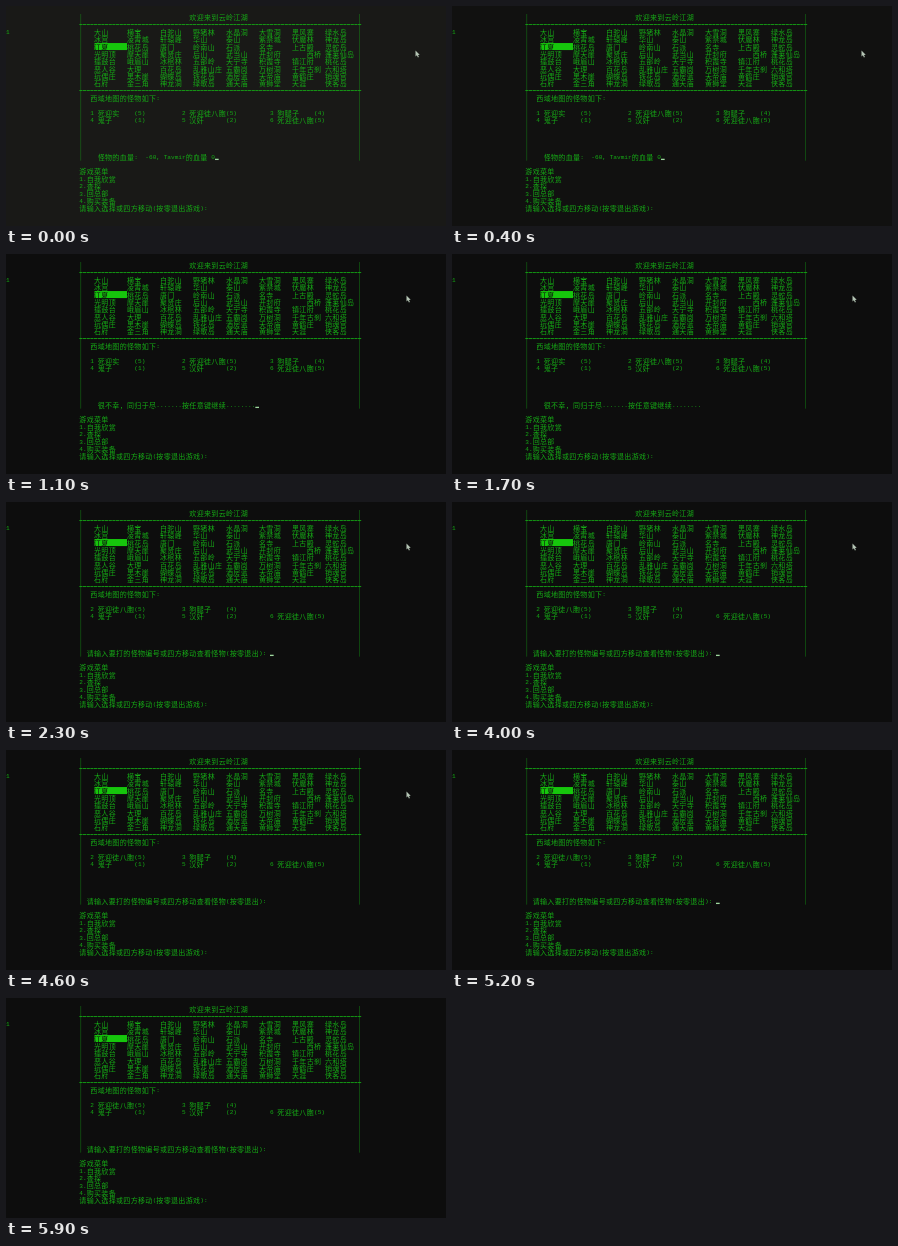
An HTML page with a canvas for the animation above (6000 ms loop, 440 by 220 pixels).

```html
<!DOCTYPE html>
<html lang="zh-CN">
<head>
<meta charset="utf-8">
<title>文字江湖</title>
<style>
  html, body { margin: 0; width: 100%; height: 100%; overflow: hidden; background: #0d0d0d; }
  canvas { display: block; width: 440px; height: 220px; }
</style>
</head>
<body>
<canvas id="stage" width="440" height="220"></canvas>
<script>
const ctx = document.getElementById('stage').getContext('2d');
const LOOP = 6000, CELL = 11 / 3, LINE = 22 / 3, TOP = 11.7;
const GREEN = '#16ac16', BRIGHT = '#16c60c', DARK = '#0d0d0d';
const HERO = 'Tavmir';

const places = [
  '大山 横宝 白驼山 野猪林 水晶洞 大雪洞 黑风寨 绿水岛',
  '冰宫 凌霄城 轩辕峰 华山 泰山 紫禁城 伏魔林 神龙岛',
  '江夏 桃花岛 唐门 岭南山 石派 名寺 上古殿 灵蛇岛',
  '光明顶 摩天崖 聚贤庄 后山 武当山 开封府 _ 蓬莱仙岛',
  '擂鼓台 峨眉山 冰棺林 五部岭 天宁寺 积霞寺 镇江府 桃花岛',
  '恶人谷 大理 百花岛 乱雅山庄 五霸岗 万树洞 千年古刹 六和塔',
  '玩偶庄 黑木崖 蝴蝶岛 铁花岛 酒房蓝 天帝庙 黄鹤庄 销魂宫',
  '石府 金三角 神龙洞 绿歌岛 通天庙 黄狮堂 天涯 侠客岛'
];
const menu = ['游戏菜单', '1.自我欣赏', '2.查探', '3.回总部', '4.购买装备',
  '请输入选择或四方移动(按零退出游戏):'];
const foes = [
  ['死迎实', 5], ['死迎徒八胞', 5], ['狗腿子', 4],
  ['鬼子', 1], ['汉奸', 2], ['死迎徒八胞', 5]
];
const ask = { col: 22, text: '请输入要打的怪物编号或四方移动查看怪物(按零退出): ' };
const scenes = [
  { at: 0, col: 25, text: `怪物的血量:  -60, ${HERO}的血量 0` },
  { at: 1050, col: 25, text: '很不幸，同归于尽.......按任意键继续........' },
  { at: 2250, ...ask },
  { at: 3050, col: 25, text: `${HERO}已没血,不可继续作战!按任意键继续......` },
  { at: 3950, ...ask }
];

const x = col => col * CELL;
const y = row => TOP + row * LINE;

// Writes on the terminal grid; wide characters take two cells. Returns the next column.
function write(text, col, row, color = GREEN) {
  ctx.fillStyle = color;
  for (const ch of text) {
    const wide = ch.charCodeAt(0) > 255;
    ctx.font = wide
      ? '300 7px "Noto Sans CJK SC", "Noto Sans CJK", sans-serif'
      : '6.1px "Liberation Mono", monospace';
    if (ch !== ' ') ctx.fillText(ch, x(col), y(row) + (wide ? 2.6 : 2.1));
    col += wide ? 2 : 1;
  }
  return col;
}

function drawFrame() {
  ctx.fillStyle = GREEN;
  ctx.globalAlpha = 0.85;
  for (const row of [1, 10])
    for (let col = 20; col < 97; col++) ctx.fillRect(x(col), y(row) - 1, 3.2, 1);
  ctx.globalAlpha = 0.45;
  for (const col of [20, 96]) ctx.fillRect(x(col) + 1, y(0) - 3.7, 0.8, LINE * 20);
  ctx.globalAlpha = 1;
}

function drawMap() {
  ctx.fillStyle = BRIGHT;
  ctx.fillRect(x(24) + 0.5, y(4) - 4, 9 * CELL - 0.5, LINE - 0.3);
  places.forEach((line, r) => line.split(' ').forEach((name, c) => {
    if (name !== '_') write(name, 24 + c * 9, r + 2, r === 2 && c === 0 ? DARK : GREEN);
  }));
  write('西桥', 82, 5);
}

function drawFoes(firstDead) {
  const cols = [23, 48, 72];
  foes.forEach(([name, count], i) => {
    if (firstDead && i === 0) return;
    const col = cols[firstDead && i < 3 ? i - 1 : i % 3];
    const row = 13 + Math.floor(i / 3);
    write(`${i + 1} ${name}`, col, row);
    write(`(${count})`, col + 12, row);
  });
}

function drawPointer(px, py) {
  const pts = [[0, 0], [0, 6], [1.4, 4.8], [2.4, 7], [3.4, 6.5], [2.5, 4.4], [4.2, 4.2]];
  ctx.beginPath();
  pts.forEach(([dx, dy]) => ctx.lineTo(px + dx, py + dy));
  ctx.closePath();
  ctx.fillStyle = '#b4c4b4';
  ctx.fill();
}

function draw(t) {
  const haze = Math.max(0, 1 - t / 600);
  const shade = Math.round(13 + 12 * haze);
  ctx.fillStyle = `rgb(${shade},${shade},${shade - Math.round(2 * haze)})`;
  ctx.fillRect(0, 0, 440, 220);

  const scene = scenes.filter(s => s.at <= t).pop();
  drawFrame();
  write('1', 0, 2);
  write('欢迎来到云岭江湖', 50, 0);
  drawMap();
  write('西域地图的怪物如下:', 23, 11);
  drawFoes(t >= scenes[2].at);
  menu.forEach((line, i) => write(line, 20, 21 + i));

  const end = write(scene.text, scene.col, 19);
  if ((t - scene.at) % 1000 < 500) {
    ctx.fillStyle = '#9fd89f';
    ctx.fillRect(x(end), y(19) + 1.7, CELL, 1.3);
  }

  if (t < 500 || (t >= 4800 && t < 5050)) drawPointer(409.5, 44.5);
  else if (t < 4800) drawPointer(400.5, 41.5);
}

const start = performance.now();
function tick() {
  draw((performance.now() - start) % LOOP);
  requestAnimationFrame(tick);
}
tick();
</script>
</body>
</html>
```
